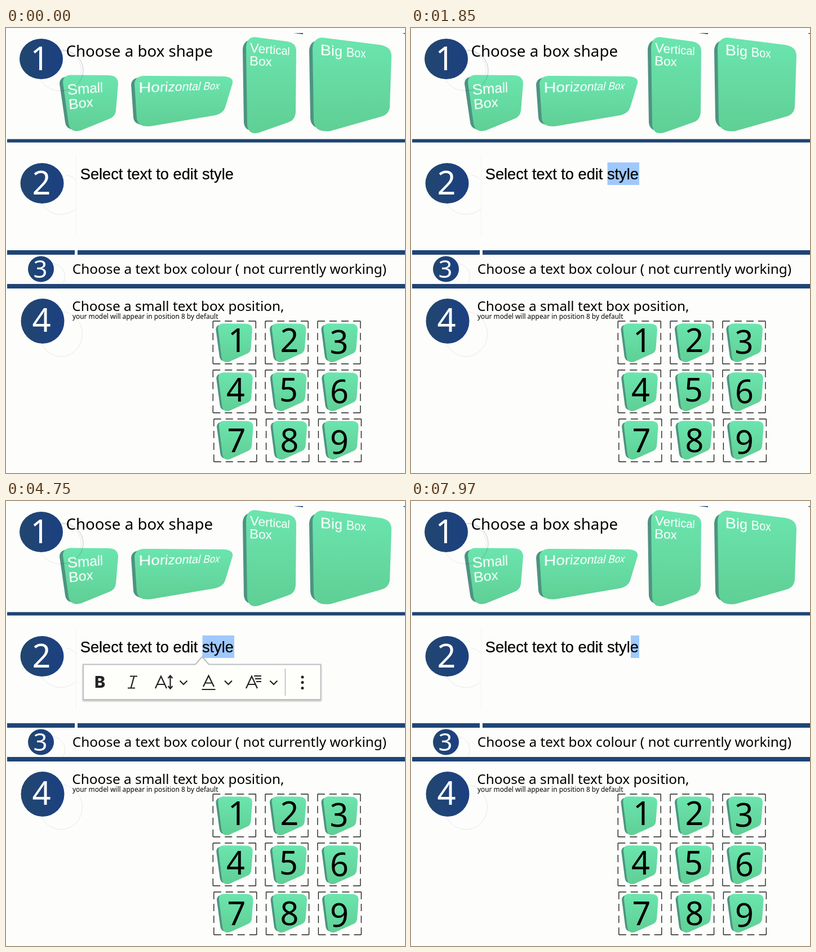
An HTML page that plays this animation: 708x791 px, repeating every 7.99 s.

```html
<!DOCTYPE html>
<html lang="en">
<head>
<meta charset="utf-8">
<title>Steps</title>
<style>
html, body { margin: 0; width: 100%; height: 100%; overflow: hidden; background: #fdfdfb; }
svg { position: absolute; left: 0; top: 0; display: block; }
text { font-family: "Noto Sans", sans-serif; }
.badge { fill: url(#navy); }
.badge-num { fill: #fff; text-anchor: middle; }
.halo { fill: none; stroke: #3b4a78; stroke-width: .8; opacity: .15; }
.bar { fill: #1f4475; }
.side { fill: #4d9380; transform-box: fill-box; transform-origin: center; transform: translateX(-6px) scaleY(.94); }
.front { fill: url(#green); }
.dash { fill: none; stroke: #222; stroke-width: 1.4; stroke-dasharray: 13 8; }
.tile-num { font-size: 57.5px; text-anchor: middle; }
.icon { fill: none; stroke: #222; stroke-width: 2.2; }
.label {
  position: absolute; left: 0; top: 0; color: #fff; white-space: pre;
  font-family: "Liberation Sans", Arial, sans-serif; transform-origin: 0 0;
}
.label span { position: absolute; left: 0; line-height: 0; }
.editable { font: 27.2px "Liberation Sans", Arial, sans-serif; stroke: #000; stroke-width: .25px; }
.bold { font: 800 29px Inter, sans-serif; fill: #222; }
#selection { fill: #9fc8fd; animation: select 7990ms step-end infinite; }
#toolbar { animation: toolbar 7990ms step-end infinite; }
#caret { animation: caret 7990ms step-end infinite; }
@keyframes select {
  0% { x: 405px; width: 0; }
  10.6% { x: 390px; width: 15px; }
  12.2% { x: 384px; width: 21px; }
  15% { x: 370px; width: 35px; }
  17% { x: 362px; width: 43px; }
  18.8% { x: 348.5px; width: 56.5px; }
  67.5% { x: 405px; width: 0; }
  98.6%, 100% { x: 390px; width: 15px; }
}
@keyframes toolbar {
  0% { opacity: 0; }
  36% { opacity: 1; }
  67.5%, 100% { opacity: 0; }
}
@keyframes caret {
  0% { opacity: 0; }
  67.5% { opacity: 1; }
  74.1% { opacity: 0; }
  80.8% { opacity: 1; }
  87.4% { opacity: 0; }
  94.1% { opacity: 1; }
  98.6%, 100% { opacity: 0; }
}
</style>
</head>
<body>
<svg width="708" height="791" viewBox="0 0 708 791">
  <defs>
    <linearGradient id="navy">
      <stop stop-color="#21466f"/><stop offset="1" stop-color="#1c4081"/>
    </linearGradient>
    <linearGradient id="green" x2="0" y2="1">
      <stop stop-color="#6be5ae"/><stop offset="1" stop-color="#5fcf95"/>
    </linearGradient>
    <filter id="shadow" x="-5%" y="-20%" width="110%" height="150%">
      <feDropShadow dx="0" dy="2" stdDeviation="1.5" flood-color="#000" flood-opacity=".25"/>
    </filter>
    <path id="small" d="M101 97Q101 84 115 83.500L183 84Q199 85 199 99L195 147Q194 158 182 162L133 182Q114 187 111 170Z"/>
    <path id="wide" d="M228 99Q229 86 244 85L386 86Q404 87 402 98L389 141Q386 151 372 155L260 174Q234 178 232 161Z"/>
    <path id="tall" d="M426 34Q427 17 441 16L500 24Q515 27 515 41L514 150Q513 164 500 168L449 186Q430 191 428 172Z"/>
    <path id="big" d="M544 36Q545 18 561 17L664 30Q684 33 684 50L681 140Q680 154 664 158L576 183Q547 187 546 164Z"/>
    <path id="chevron" d="M0 0l6.500 6.500L13 0"/>
  </defs>

  <g class="bar">
    <path d="M510 9h17v2zM704 9h4v2z"/>
    <path d="M2 197.500H708v6H2zM2 395H122v8H2zM127 395H708v8H127zM2 455H708v8H2z"/>
  </g>
  <path d="M124.500 225V370" stroke="#000" opacity=".04"/>

  <g id="badges"></g>
  <g id="boxes"></g>
  <path class="halo" d="M100 39.500A38 36 0 0 1 98 111.500" style="opacity:.4"/>

  <text x="106.500" y="51" font-size="27.700">Choose a box shape</text>
  <text x="117.800" y="437" font-size="24.360">Choose a text box colour ( not currently working)</text>
  <text x="117.300" y="503" font-size="24.360">Choose a small text box position,</text>
  <text x="118" y="517" font-size="11.880">your model will appear in position 8 by default</text>

  <rect id="selection" y="239" height="40"/>
  <text class="editable" x="131.800" y="269">Select text to edit style</text>
  <path id="caret" d="M405 243V275" stroke="#222" stroke-width="1.400"/>

  <g id="toolbar">
    <path d="M137 290.500H336L348 277L360 290.500H558.500V353H137Z" fill="#fefefb" stroke="#bcc0c4" stroke-width="2" filter="url(#shadow)"/>
    <text class="bold" x="157" y="332">B</text>
    <g class="icon">
      <path d="M220 311.500H233M216 332.500H229M227.500 311L221.500 333"/>
      <path d="M265 333L275 311.500L285 333M268.500 326H281.500"/>
      <path d="M291.500 311V333M287.500 315L291.500 310.500L295.500 315M287.500 329L291.500 333.500L295.500 329"/>
      <path d="M350 330L359.500 310.500L369 330M353.500 323.500H365.500M347.500 335H371.500"/>
      <path d="M426 333L436 311.500L446 333M429.500 326H442.500M440 311H453M442 316H453M444 321H453"/>
      <use href="#chevron" x="308.500" y="319.500"/>
      <use href="#chevron" x="388" y="319.500"/>
      <use href="#chevron" x="468.500" y="319.500"/>
    </g>
    <path d="M495.500 298V346" stroke="#b4b8bc" stroke-width="1.500"/>
    <g fill="#222">
      <circle cx="526" cy="313" r="2.500"/><circle cx="526" cy="322.500" r="2.500"/><circle cx="526" cy="332.500" r="2.500"/>
    </g>
  </g>

  <g id="tiles"></g>
</svg>

<script>
const fill = (id, parts) => { document.getElementById(id).innerHTML = parts.join(''); };

// cx, cy, rx, ry, number x, baseline, number size, halo offset x and y
const badges = [
  [62.5, 55, 38.5, 36, 60, 75, 57.5, 33, 20.5],
  [64, 276, 38.5, 36, 63, 296, 57.5, 33, 20.5],
  [62, 428.5, 23, 23, 61, 444, 43.5, 20, 13.5],
  [65, 521, 38.5, 40, 63, 540, 58, 32.5, 23]
];
fill('badges', badges.map(([cx, cy, rx, ry, x, y, size, dx, dy], i) => {
  const halo = i === 1
    ? `<path class="halo" d="M107 261.5Q118 263 124 271M124 321A38 36 0 0 1 61 306"/>`
    : `<ellipse class="halo" cx="${cx + dx}" cy="${cy + dy}" rx="${rx - .5}" ry="${ry}"/>`;
  return halo + `<ellipse class="badge" cx="${cx}" cy="${cy}" rx="${rx}" ry="${ry}"/>
    <text class="badge-num" x="${x}" y="${y}" font-size="${size}">${i + 1}</text>`;
}));

const box = name => `<use class="side" href="#${name}"/><use class="front" href="#${name}"/>`;
fill('boxes', ['small', 'wide', 'tall', 'big'].map(box));

const tileX = [372.5, 468, 559.5], tileY = [525, 612, 698];
const numX = [[410.5, 503, 591], [407.5, 501.5, 591.5], [409, 503, 591.5]];
fill('tiles', Array.from({ length: 9 }, (_, i) => {
  const col = i % 3, row = Math.floor(i / 3);
  const left = 367.3 + 92.8 * col + (row === 2 ? 1.5 : 0), top = 521 + 87 * row;
  const y = [576, 664, 754][row] + (col === 2 ? 2.5 : 0);
  return `<path class="dash" transform="translate(${left} ${top})" d="M0 0H76M76 0V76M0 76H76M0 0V76"/>
    <g transform="translate(${tileX[col] + row * .8} ${tileY[row]}) scale(.62 .69) translate(-95 -83)">${box('small')}</g>
    <text class="tile-num" x="${numX[row][col]}" y="${y}">${i + 1}</text>`;
}));

// Perspective text: [a, b, p] maps the baseline, [c, d, q] the vertical
function label(lines, x, y, size, [a, b, p], [c, d, q]) {
  const el = document.createElement('div');
  el.className = 'label';
  el.style.fontSize = size + 'px';
  el.style.transform = `translate(${x}px,${y}px) matrix3d(${a},${b},0,${p},${c},${d},0,${q},0,0,1,0,0,0,0,1)`;
  lines.forEach((line, i) => {
    const span = document.createElement('span');
    span.textContent = line;
    span.style.top = i * size - size * .347 + 'px';
    el.append(span);
  });
  document.body.append(el);
}
label(['Small', 'Box'], 109.5, 119, 26, [1.07, -.085, .0017], [.09, 1.02, .0012]);
label(['Horizontal Box'], 235.5, 115, 26, [1.21, -.051, .0026], [.02, .98, .0022]);
label(['Vertical', 'Box'], 432.5, 43, 24, [1.03, .08, .0018], [-.03, .97, 0]);
label(['Big Box'], 557.5, 48, 27, [1.146, .07, .0034], [0, 1, 0]);
</script>
</body>
</html>
```
